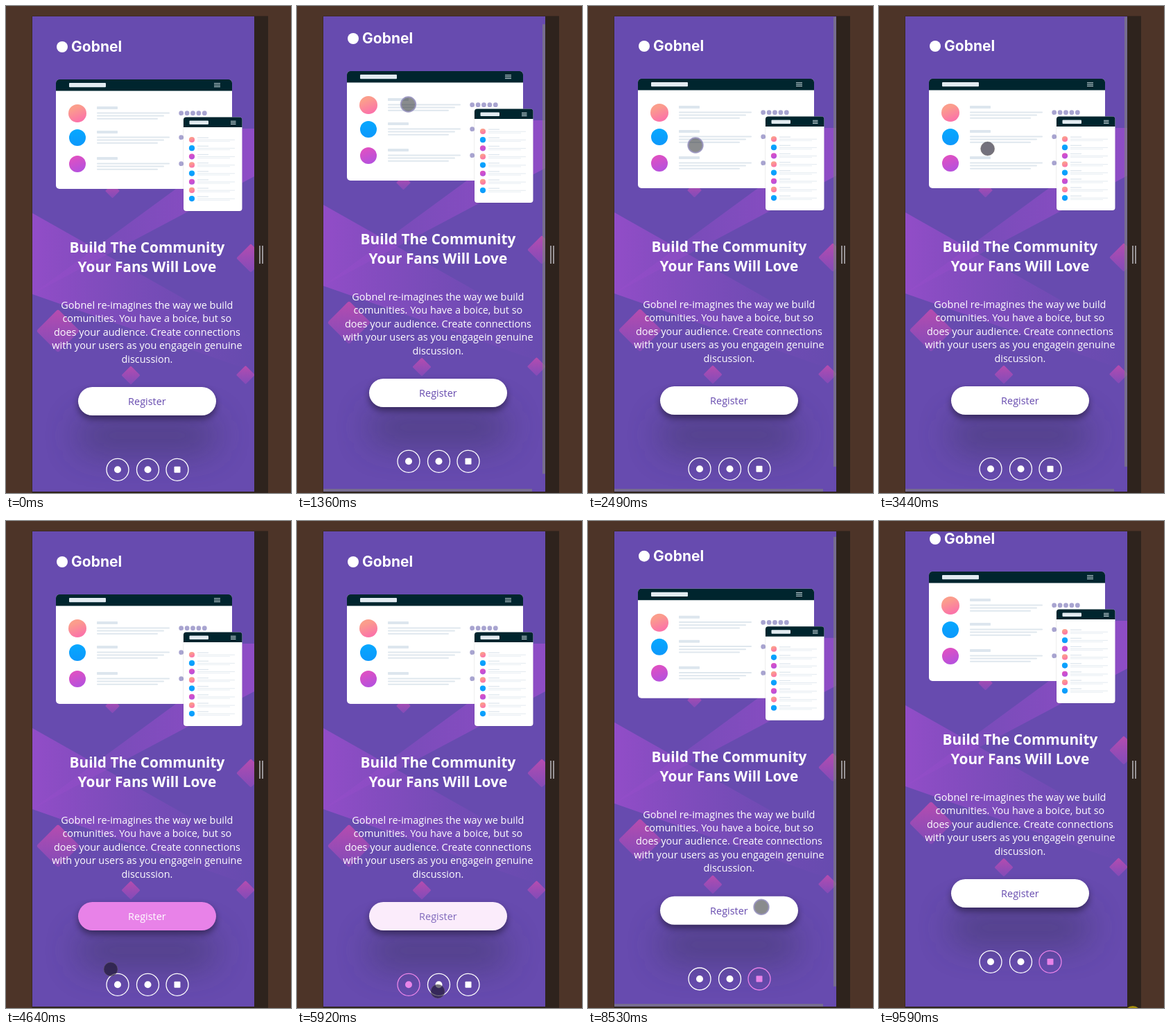
These frames come from a looping animation (411x703 px, 9720 ms). An HTML page:

```html
<!DOCTYPE html>
<html lang="en">
<head>
<meta charset="utf-8">
<title>Landing page on a phone</title>
<style>
html, body { margin: 0; width: 100%; height: 100%; overflow: hidden; background: #4d3428; }
svg { display: block; }
text { font-family: "Open Sans", sans-serif; fill: #fff; text-anchor: middle; }
.brand { font: 700 21px Inter, sans-serif; text-anchor: start; }
.title { font-weight: 700; font-size: 20.8px; }
.copy { font-size: 14.45px; }
</style>
</head>
<body>
<svg width="411" height="703" viewBox="0 0 411 703">
  <defs>
    <clipPath id="screen"><rect x="38" y="15" width="320" height="686"/></clipPath>
    <linearGradient id="bandA"><stop stop-color="#a44ed2" stop-opacity=".7"/><stop offset="1" stop-color="#8a4cc0" stop-opacity="0"/></linearGradient>
    <linearGradient id="bandB"><stop stop-color="#a44ed2" stop-opacity=".12"/><stop offset="1" stop-color="#a44ed2" stop-opacity=".65"/></linearGradient>
    <linearGradient id="gem" x2="1" y2="1"><stop stop-color="#c64cae" stop-opacity=".85"/><stop offset="1" stop-color="#a04cc0" stop-opacity=".5"/></linearGradient>
    <linearGradient id="salmon" x2=".4" y2="1"><stop offset=".3" stop-color="#fb9d8c"/><stop offset="1" stop-color="#fb74a8"/></linearGradient>
    <linearGradient id="blue" x2="0" y2="1"><stop stop-color="#06a8ff"/><stop offset="1" stop-color="#0d98fb"/></linearGradient>
    <linearGradient id="magenta" x2=".4" y2="1"><stop stop-color="#e750bd"/><stop offset="1" stop-color="#b751dc"/></linearGradient>
    <filter id="soft" x="-50%" y="-250%" width="200%" height="600%"><feGaussianBlur stdDeviation="25"/></filter>
    <filter id="near" x="-20%" y="-60%" width="140%" height="220%"><feGaussianBlur stdDeviation="5"/></filter>
  </defs>
  <rect x="37.5" y="14.5" width="340.5" height="689" fill="#2e231d"/>
  <path d="M366 346v26M370 346v26" stroke="#a3a0a5" stroke-width="1.8"/>
  <g clip-path="url(#screen)">
    <rect x="38" y="15" width="320" height="686" fill="#674baf"/>
    <g id="page"></g>
    <g id="bars" fill="#808080" fill-opacity=".65">
      <rect id="thumb" x="354" width="4" height="649"/>
      <rect x="38" y="697" width="301" height="4"/>
    </g>
    <circle id="cursor"/>
  </g>
  <circle id="pointer" cx="366" cy="712" r="12" fill="#a48d0c"/>
</svg>
<script>
const LOOP = 9720, WHITE = [255, 255, 255], PINK = [232, 130, 232], VIOLET = [103, 75, 175];
const $ = id => document.getElementById(id);
const rect = (x, y, w, h, fill, r = 0, more = '') =>
  `<rect x="${x}" y="${y}" width="${w}" height="${h}" rx="${r}" fill="${fill}" ${more}/>`;
const dot = (x, y, r, fill) => `<circle cx="${x}" cy="${y}" r="${r}" fill="${fill}"/>`;
const gem = (x, y, half) => {
  const side = half * 1.48;
  return rect(x - side / 2, y - side / 2, side, side, 'url(#gem)', half / 9, `transform="rotate(45 ${x} ${y})"`);
};
const lines = (cls, y, step, list) =>
  list.map((s, i) => `<text class="${cls}" x="203.4" y="${y + i * step}">${s}</text>`).join('');
const tones = ['salmon', 'blue', 'magenta'].map(n => `url(#${n})`);
const burger = (x, y, w, gap) =>
  [0, 1, 2].map(i => rect(x, y + i * gap, w, 1, '#cfdde2')).join('');

function window1() {
  let s = rect(72, 106, 254, 158, '#fff', 5) +
    `<path d="M72 122.5V111a5 5 0 0 1 5-5h244a5 5 0 0 1 5 5v11.500z" fill="#00252e"/>` +
    rect(91, 111, 53, 6.3, '#e2ebf1', 1) + burger(300, 111.3, 9, 2.4);
  [155, 190, 228].forEach((y, i) => {
    s += dot(103, y, i ? 12 : 13, tones[i]) + rect(131, y - 10, 30, 4, '#dde6ee', .8);
    [105, 97, 88].forEach((w, k) => s += rect(131, y - 1.6 + k * 4.2, w, 2, '#dfe7ee', 1));
    for (let k = 0; k < (i ? 1 : 5); k++) s += dot(252.7 + k * 8.4, y - .3, 3.4, '#a8a4d0');
  });
  return s;
}

function window2() {
  let s = rect(255.500, 160.500, 85, 136, '#0002', 4) + rect(256, 160.500, 84.500, 135.500, '#fff', 4) +
    `<path d="M256 175v-10.500a4 4 0 0 1 4-4h76.500a4 4 0 0 1 4 4V175z" fill="#00252e"/>` +
    rect(264.500, 165.500, 27.500, 5.500, '#e2ebf1', 1) + burger(324, 165.800, 7.500, 2.100);
  for (let i = 0; i < 8; i++) {
    const y = 193 + i * 12.150;
    s += dot(268, y, 4.100, tones[i % 3]) + rect(276, y - 3.500, 16, 1.300, '#dfe7ee') +
      rect(276, y - .3, 54, 1, '#e3eaf0') + rect(276, y + 1.800, 47, 1, '#e8eef3');
  }
  return s;
}

const icons = [161, 204.500, 247].map((x, i) => `<g id="icon${i}">
  <circle cx="${x}" cy="669.3" r="16" fill="none" stroke="currentColor" stroke-width="1.3"/>` +
  (i < 2 ? dot(x, 669.3, 5, 'currentColor') : rect(x - 4.500, 664.800, 9, 9, 'currentColor', 1)) + '</g>').join('');

$('page').innerHTML =
  '<path d="M38 299L358 480V528L38 416z" fill="url(#bandA)"/>' +
  '<path d="M38 416L245 264 341 177H358V246z" fill="url(#bandB)"/>' +
  gem(75, 469, 30) + gem(353, 364, 20) + gem(153.500, 267, 10) + gem(180, 533, 13) + gem(345.500, 532.500, 13) +
  dot(81, 59, 8, '#fff') + '<text class="brand" x="94" y="66">Gobnel</text>' +
  window1() + window2() +
  lines('title', 356, 28, ['Build The Community', 'Your Fans Will Love']) +
  lines('copy', 437, 19.400, ['Gobnel re-imagines the way we build', 'comunities. You have a boice, but so',
    'does your audience. Create connections', 'with your users as you engagein genuine', 'discussion.']) +
  rect(104, 595, 199, 50, '#32324f', 20, 'opacity=".45" filter="url(#soft)"') +
  rect(104, 555, 199, 41, '#000', 20, 'opacity=".4" filter="url(#near)"') +
  rect(104, 550, 199, 41, '#fff', 20.500, 'id="button"') +
  '<text id="label" class="copy" x="203.4" y="576">Register</text>' + icons;

// Keys are [time, value, ...]; each segment eases in and out.
function track(keys, t) {
  const n = keys.findIndex(k => k[0] > t);
  if (n < 1) return keys[n ? keys.length - 1 : 0].slice(1);
  const [a, b] = [keys[n - 1], keys[n]], u = (t - a[0]) / (b[0] - a[0]), e = u * u * (3 - 2 * u);
  return a.slice(1).map((v, i) => v + (b[i + 1] - v) * e);
}

const scrollKeys = [[1230, 0], [1360, 12], [1650, 39], [1800, 39], [2150, 3], [2489, 3], [2490, 1], [2560, 1],
  [2900, 33], [3000, 33], [3440, 1], [3570, 0], [8400, 0], [8800, 33]];
const barKeys = [[1280, 0], [1300, 1], [3440, 1], [3800, 0], [8440, 0], [8470, 1], [8850, 1], [9110, 0]];
const cursorKeys = [[140, 332, 652], [1090, 158, 143], [1150, 160.500, 142], [1400, 160.500, 142], [1650, 158, 115],
  [2150, 156, 190], [2489, 156, 190], [2490, 155, 201], [2560, 155, 201], [2900, 155, 169], [3000, 155, 169],
  [3400, 156, 201], [4000, 203, 572], [4150, 203, 572], [4600, 151, 647], [4700, 151, 647], [5180, 166, 684],
  [5320, 170, 681], [5450, 174, 681], [5650, 178, 681], [5900, 203, 679], [6520, 203, 678], [6750, 228, 661],
  [6970, 251, 678], [7440, 251, 678], [7900, 245, 659], [8000, 245, 659], [8330, 250, 561], [8460, 250, 561],
  [8800, 250, 528], [9120, 340, 716]];
const presses = [[1150, 3400], [4030, 4130], [5320, 5450], [6420, 6520], [7300, 7440], [8460, 8800]];

const fade = (on, off, t) => track([[on, 0], [on + 400, 1], [off, 1], [off + 400, 0]], t)[0];
const mix = (a, b, u) => `rgb(${a.map((v, i) => Math.round(v + (b[i] - v) * u))})`;
const set = (el, attrs) => Object.entries(attrs).forEach(([k, v]) => el.setAttribute(k, v));

function draw(t) {
  const [scroll] = track(scrollKeys, t), [x, y] = track(cursorKeys, t);
  const pressed = presses.some(([a, b]) => t >= a && t < b);
  set($('page'), { transform: `translate(0 ${-scroll})` });
  set($('bars'), { opacity: track(barKeys, t)[0] });
  set($('thumb'), { y: 15 + scroll * .946 });
  set($('cursor'), {
    cx: x, cy: y, r: pressed ? 10.700 : 10, fill: pressed ? 'rgba(30,34,38,.52)' : 'rgba(24,18,36,.6)',
    stroke: pressed ? 'rgba(150,146,190,.85)' : 'rgba(110,100,90,.5)', 'stroke-width': pressed ? 2 : .8,
    visibility: t >= 140 && t < 9120 ? 'visible' : 'hidden'
  });
  set($('pointer'), { visibility: t >= 9590 ? 'visible' : 'hidden' });
  const hot = fade(4080, 5620, t);
  set($('button'), { fill: mix(WHITE, PINK, hot) });
  $('label').style.fill = mix(VIOLET, WHITE, hot);
  [[5560, 6520], [6520, 7440], [7440, 99999]].forEach(([on, off], i) =>
    set($('icon' + i), { color: mix(WHITE, PINK, fade(on, off, t)) }));
}

const start = performance.now();
function tick() {
  draw((performance.now() - start) % LOOP);
  requestAnimationFrame(tick);
}
tick();
</script>
</body>
</html>
```
